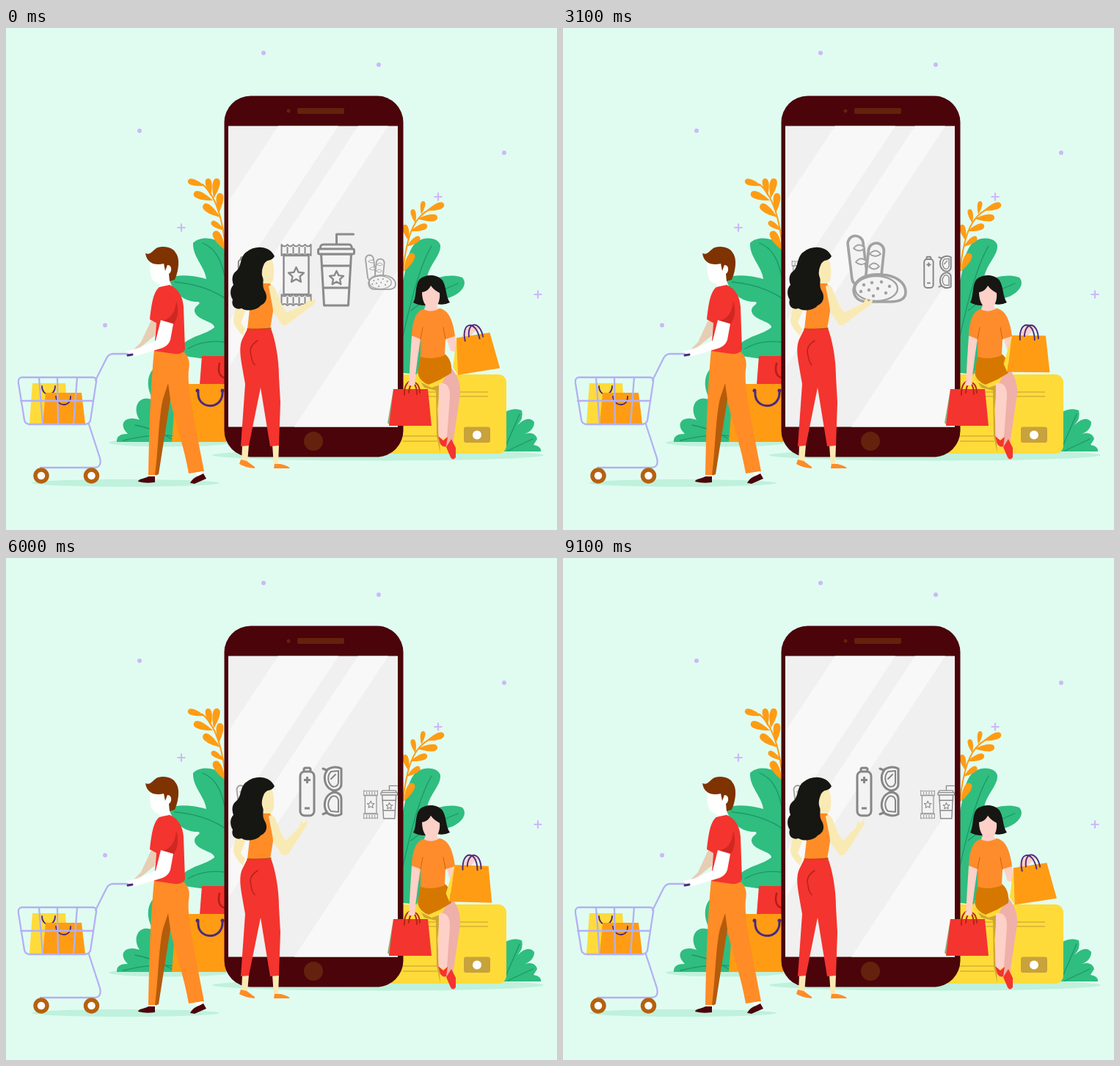
Recreate the animation shown at these times as an HTML page. Size 751 by 684 pixels, loop 9200 ms.

```html
<!DOCTYPE html>
<html lang="en">
<head>
<meta charset="utf-8">
<title>Mobile shopping</title>
<style>
html, body { margin: 0; width: 100%; height: 100%; overflow: hidden; background: #e0fcf1; }
svg { display: block; width: 100%; height: 100%; }
.line { fill: none; stroke-linecap: round; stroke-linejoin: round; }
.red { fill: #f4342e; } .orange { fill: #ff8c26; } .bag { fill: #ff9c14; } .yellow { fill: #ffdb3a; }
.skin { fill: #f9eab4; } .pink { fill: #fdd0c8; } .dark { fill: #4a040a; } .black { fill: #161612; }
.green { fill: #30bd80; } .vein { stroke: #1c9767; stroke-width: 1.3; }
.purple { stroke: #4b2a7c; }
.item { stroke-linejoin: round; stroke-linecap: round; fill: #f3f3f3; }
</style>
</head>
<body>
<svg viewBox="0 0 751 684">
  <g id="sparkles" fill="#cdb8f8" stroke="#cdb8f8"></g>
  <g fill="#bff1dc">
    <ellipse cx="222" cy="565" rx="82" ry="5.5"/>
    <ellipse cx="507" cy="582" rx="226" ry="7.5"/>
    <ellipse cx="163" cy="620" rx="128" ry="5"/>
  </g>

  <!-- plants -->
  <g class="green">
    <path d="M300 455L243 447Q236 440 240 432C250 420 272 418 284 408C285 400 259 398 257 386C256 378 268 376 262 373C240 374 226 356 222 341C236 334 258 338 273 342C271 325 254 312 255 293C264 283 288 284 300 300Z"/>
    <path d="M541 470V345C546 328 546 300 562 290C575 283 590 287 592 296C593 310 577 322 574 340C588 344 600 333 622 340C631 350 618 364 602 368C588 374 576 382 574 392L570 440L560 472Z"/>
    <path d="M151 564Q150 553 166 553C152 540 162 527 182 534C170 515 184 497 202 508C188 490 192 462 212 459L232 480V564Z"/>
    <path d="M676 577V526Q690 516 703 521Q706 532 697 541Q712 527 720 537Q720 548 707 553Q721 549 724 560L719 568Q730 570 729 577Z"/>
  </g>
  <path class="line vein" d="M298 338C292 310 282 299 268 293M298 368Q272 350 230 346M298 428Q270 424 248 437M541 420C552 370 566 320 580 297M552 385Q580 362 616 348M160 562Q200 552 228 556M176 541Q200 545 226 560M200 480Q206 500 212 520M680 572Q692 545 700 526M684 576Q705 566 718 560"/>
  <g id="twigs" fill="#ff9c14">
    <path class="line" stroke="#ff9c14" stroke-width="2" d="M299 300C296 265 287 230 268 213M541 330C546 290 553 260 576 248"/>
  </g>

  <!-- bags behind the phone -->
  <path class="red" d="M267 447H300V486H264Z"/>
  <path class="line" stroke="#b01f1a" stroke-width="2.5" d="M291 457C288 470 292 476 300 477"/>
  <path class="bag" d="M232 485H300V564H226Z"/>
  <path class="line purple" stroke-width="3" d="M262 496C260 521 296 521 295 496"/>
  <circle cx="261" cy="494" r="2.5" fill="#4b2a7c"/><circle cx="295" cy="494" r="2.5" fill="#4b2a7c"/>

  <!-- card -->
  <rect class="yellow" x="515" y="472" width="167" height="108" rx="11"/>
  <path stroke="#d6b235" stroke-width="1.6" d="M560 496H657M560 502H657M541 556H588M541 563H588"/>
  <rect x="624" y="543.5" width="36" height="21.5" rx="3" fill="#c8a23a"/>
  <circle cx="642" cy="554.5" r="6" fill="#fff"/>

  <!-- phone -->
  <rect class="dark" x="297.5" y="92.5" width="244" height="492" rx="36"/>
  <rect x="303" y="133.5" width="231" height="410" fill="#f0f0f0"/>
  <path fill="#f8f8f8" d="M371 133.5H453L303 360V236ZM480 133.5H521L303 463V401ZM534 330V543.5H393Z"/>
  <g fill="#64210d"><rect x="397" y="109" width="64" height="8" rx="2"/><circle cx="385" cy="113" r="2.5"/><circle cx="419" cy="563" r="13"/></g>

  <!-- products -->
  <g id="snack" class="item" stroke="#8a8a8a" stroke-width="3">
    <path stroke-width="2.4" d="M379 310V363H413V310Z"/>
    <path id="crimp" stroke-width="2"/>
    <path d="M451 295V281H474" fill="none"/>
    <path d="M430 308L434 378H467L471 308ZM429 302Q428 295 433 295H468Q472 295 472 302Z"/>
    <rect x="426" y="301" width="49" height="7" rx="2"/>
    <path d="M431 324H470M433 354H468"/>
  </g>
  <g id="glasses" class="item" stroke="#868686" stroke-width="3">
    <rect x="406" y="286" width="9" height="7" rx="2"/>
    <rect x="401" y="291" width="19" height="60" rx="6"/>
    <path d="M410.5 298V307M406 302.5H415M407 341H414" stroke-linecap="butt"/>
    <path id="lens" d="M432 287L437 289C444 284 452 284 457 287V308C457 315 450 318 444 316C433 311 432 296 438 289"/>
    <path stroke-width="2" d="M453 290V306C452 312 446 313 443 310C438 304 438 296 443 291Z"/>
    <path d="M432 349L437 347C444 352 452 352 457 349V328C457 321 450 318 444 320C433 325 432 340 438 347"/>
    <path stroke-width="2" d="M453 346V330C452 324 446 323 443 326C438 332 438 340 443 345ZM443 301L449 295"/>
  </g>
  <g id="bread" class="item" stroke="#a2a2a2" stroke-width="3.6">
    <rect x="391" y="283" width="21" height="68" rx="10.5" transform="rotate(-7 402 317)"/>
    <rect x="414.5" y="293" width="21" height="58" rx="10.5" transform="rotate(6 425 322)"/>
    <path stroke-width="1.8" d="M396 300Q404 291 411 300Q404 307 396 300ZM399 319Q406 310 414 318Q407 326 399 319ZM418 308Q426 299 433 308Q426 314 418 308ZM417 325Q424 316 431 325Q424 332 417 325Z"/>
    <path d="M396 357C398 340 416 335 434 336C454 337 467 347 467 360C467 370 458 373 446 373H414Q397 372 396 357Z"/>
    <ellipse cx="427" cy="355" rx="29" ry="17" stroke-width="2.4"/>
    <g id="seeds" fill="#a2a2a2" stroke="none"></g>
  </g>
  <g id="hearts"></g>

  <!-- man and cart -->
  <path class="yellow" d="M36 484H81L85 539H32Z"/>
  <path class="line purple" stroke-width="1.8" d="M49 488C49 503 67 503 67 488"/>
  <path class="bag" d="M54 497H103L108 539H50Z"/>
  <path class="line purple" stroke-width="1.8" d="M68 502C69 517 89 517 88 502"/>
  <path fill="#e8cdb5" d="M198 398L205 402L203 419L182 436L172 440L184 428Z"/>
  <path class="orange" d="M202 438L243 442Q252 450 249 466C246 490 260 550 270 604L249 607C243 570 228 530 221 495C216 540 208 580 204 611L194 609C195 560 196 500 202 438Z"/>
  <path fill="#b35c0c" d="M221 484L224 506L208 608L203 610C208 570 208 530 214 505Z"/>
  <path fill="#fff" d="M194 609H204V613H193ZM257 606L268 604L269 609L262 611ZM197 318L222 322C227 324 226 332 222 335L224 352L208 356L210 349C198 347 195 336 197 318Z"/>
  <path class="dark" d="M203 611V619Q190 621 180 618C180 614 190 614 194 611ZM269 607L273 614L257 621L251 620C254 614 258 612 263 610Z"/>
  <path fill="#7f3300" d="M190 307C198 310 200 302 207 299C219 296 229 301 231 306C238 314 235 332 230 343L223 345L222 335C227 332 226 322 220 323L217 331L215 321C204 324 192 321 190 307Z"/>
  <path class="red" d="M209 353L223 350C235 355 241 366 242 380L244 438Q240 445 230 444L202 440L205 402L196 397C198 380 200 360 209 353Z"/>
  <path fill="#cf2823" d="M232 372Q238 390 228 404L212 399Q230 396 232 372Z"/>
  <path fill="#fff" d="M211 398L228 403L224 425Q221 433 213 436L180 446Q169 449 164 444V440L178 437L204 426Z"/>
  <path class="line" stroke="#b3b0f3" stroke-width="2.3" d="M166 444H146Q140 444 137 450L122 480M22 476H118Q124 476 123 482L115 535Q113 540 107 540H33Q26 540 25 534L17 484Q16 476 22 476ZM20 508H119M45 476L50 540M70 476L71 540M97 476L92 540M113 540L128 586Q131 599 120 599H47"/>
  <path class="line purple" stroke-width="3" d="M166 446L172 445"/>
  <g fill="#fff" stroke="#b5610f" stroke-width="5.5"><circle cx="48" cy="610" r="8"/><circle cx="116.5" cy="610" r="8"/></g>

  <!-- standing woman -->
  <path class="skin" d="M313 380L327 384L320 402L326 410L323 419C315 412 309 403 310 396ZM350 316L362 315C366 322 366 336 364 344L360 349L348 352ZM322 568H331L329 592H321ZM363 568H372L371 596H365Z"/>
  <path class="orange" d="M348 348L360 348C367 360 363 374 364 386L360 410H329L333 375ZM320 588L328 590L339 598V600Q326 599 318 594ZM366 594L374 594Q386 597 387 600H365Z"/>
  <path class="red" d="M329 410L361 409C367 425 372 450 372 475L374 510L372 569L360 570L347 490L331 569L320 570L326 485C321 455 316 438 322 424Z"/>
  <path class="line" stroke="#b94d16" stroke-width="1.5" d="M329 410Q346 412 361 409"/>
  <path class="line" stroke="#b9221d" stroke-width="1.5" d="M343 426Q330 434 334 446Q335 455 339 459"/>
  <path class="skin" d="M358 352Q364 346 369 360L375 375L384 390L382 405H377L365 388Z"/>
  <path id="forearm" class="skin" d="M378 391Q384 386 389 385L409 375L414 367L416 373L421 369Q424 374 416 379L383 404Q375 407 374 398Z"/>
  <path class="black" d="M366 311C360 297 340 295 328 305C318 312 322 324 314 331C307 336 308 344 310 350C304 356 306 366 309 370C306 379 314 385 321 382C329 387 343 384 347 378C357 374 356 364 353 359C348 351 352 345 350 340C347 333 350 326 352 321C357 314 361 319 366 311Z"/>

  <!-- seated woman -->
  <path fill="#cfa632" d="M560 474L566 483L580 490L592 486L588 520L592 580L587 555L586 494L570 490Z"/>
  <path class="black" d="M555 374C560 366 557 350 564 342C573 335 588 335 595 344C601 354 599 366 605 374Q597 378 588 376L570 378Q562 378 555 374Z"/>
  <path class="pink" d="M567 360C574 359 577 355 579 351C583 357 588 359 591 361C592 370 589 376 587 379L591 384L580 391L569 385L572 378Q567 371 567 360ZM553 419L565 423L561 450L557 482L549 487L551 450ZM600 422L612 419L614 432L630 406Q638 400 645 410L638 414L616 442L606 440Z"/>
  <path fill="#eeb0a8" d="M592 488L606 462C618 475 621 490 618 506L609 568L600 570Z"/>
  <path class="pink" d="M590 484Q606 482 605 503L601 558L590 561C588 540 590 510 590 484Z"/>
  <path class="red" d="M589 556L596 562L602 557L600 570Q596 572 592 567ZM600 571L607 560L613 572V585Q609 590 606 585Z"/>
  <path fill="#d67800" d="M565 446Q580 452 598 444C606 450 608 460 607 470L592 479L576 486Q564 482 561 470Z"/>
  <path fill="#fe8c2b" d="M569 383Q579 389 591 382C602 384 609 396 612 420L599 424L598 446Q580 453 565 448L565 424L553 419C554 400 558 386 569 383Z"/>
  <path class="line" stroke="#c96614" stroke-width="1" d="M565 424L568 408M599 424L596 408"/>
  <path fill="#8fae7a" d="M528 492L520 538L524 542Z"/>
  <path class="red" d="M528 492H575L580 542H522Z"/>
  <path class="line" stroke="#b52418" stroke-width="2" d="M543 500C542 476 560 476 560 499M549 497C550 478 564 480 564 497"/>
  <ellipse class="pink" cx="553" cy="484" rx="5" ry="3.5"/>
  <g id="swing">
    <path class="yellow" d="M612 419L601 458L606 469Z"/>
    <path class="bag" d="M612 419H658L664 469H606Z"/>
    <path class="line purple" stroke-width="1.9" d="M623 425C621 398 642 398 643 425M629 420C630 399 647 400 648 423"/>
  </g>
</svg>
<script>
const $ = id => document.getElementById(id);
const add = (id, markup) => $(id).insertAdjacentHTML('beforeend', markup);
const clamp = v => Math.max(0, Math.min(1, v));
const ease = (t, a, b) => { const x = clamp((t - a) / (b - a)); return x * x * (3 - 2 * x); };
const mix = (a, b, p) => a + (b - a) * p;
const LOOP = 9200;

for (const [x, y] of [[351, 34], [508, 50], [182, 140], [679, 170], [135, 405]])
  add('sparkles', `<circle cx="${x}" cy="${y}" r="3" stroke="none"/>`);
for (const [x, y] of [[239, 272], [589, 230], [725, 363]])
  add('sparkles', `<path stroke-width="2.2" d="M${x - 5.5} ${y}h11M${x} ${y - 5.5}v11"/>`);

// Slender drop, round at the tip and pointed at the base
function leaf(x1, y1, x2, y2) {
  const nx = (y2 - y1) * .24, ny = (x1 - x2) * .24;
  const mx = mix(x1, x2, .4), my = mix(y1, y2, .4);
  add('twigs', `<path d="M${x1} ${y1}C${x1 + nx} ${y1 + ny} ${mx + nx} ${my + ny} ${x2} ${y2}C${mx - nx} ${my - ny} ${x1 - nx} ${y1 - ny} ${x1} ${y1}"/>`);
}
[[248, 208, 271, 215], [275, 205, 279, 229], [288, 205, 283, 232], [256, 225, 282, 235],
 [292, 225, 290, 252], [269, 241, 292, 258], [280, 264, 298, 276], [284, 277, 299, 303],
 [597, 240, 573, 249], [569, 236, 566, 254], [554, 247, 558, 266], [588, 258, 561, 260],
 [574, 269, 551, 277], [543, 268, 549, 290], [564, 285, 546, 298], [555, 307, 542, 332]
].forEach(l => leaf(...l));

function star(x, y, r) {
  const pts = Array.from({ length: 10 }, (_, i) => {
    const a = i * Math.PI / 5 - Math.PI / 2, d = i % 2 ? r * .48 : r;
    return `${x + d * Math.cos(a)},${y + d * Math.sin(a)}`;
  });
  add('snack', `<polygon stroke-width="2.4" points="${pts.join(' ')}"/>`);
}
star(396, 337, 11);
star(451, 341, 10);

// Crimped wrapper ends
let crimp = '';
for (const y of [295, 363]) {
  crimp += `M376 ${y}` + 'q4 5 8 0'.repeat(5) + 'v15' + 'q-4 -4 -8 0'.repeat(5) + 'z';
  for (let x = 384; x < 415; x += 8) crimp += `M${x} ${y + 4}v8`;
}
$('crimp').setAttribute('d', crimp);

for (const [x, y] of [[410, 350], [421, 347], [434, 346], [445, 352], [406, 359], [417, 357], [429, 355], [440, 361], [423, 365]])
  add('seeds', `<circle cx="${x}" cy="${y}" r="2.2"/>`);

const likes = [[322, 273, 15, 0], [277, 244, 10, 18], [305, 231, 6, 0], [329, 231, 6.5, 0]].map(([x, y, r, turn]) => {
  add('hearts', `<g><path fill="#f4513f" d="M-15 0A15 15 0 1 1 11 10L14 15L6 13.7A15 15 0 0 1 -15 0Z"/><path fill="#fff" d="M0 8C-16 -3 -5 -11 0 -4C5 -11 16 -3 0 8Z"/></g>`);
  return { node: $('hearts').lastElementChild, x, y, r, turn };
});

// Carousel: slot 0 is the centre, 1 the right side, 2 the left side
const products = [
  { node: $('snack'), x: 425, y: 329, small: .46, bend: .4 },
  { node: $('bread'), x: 427.5, y: 327.5, small: .52, bend: 1 },
  { node: $('glasses'), x: 429, y: 318, small: .65, bend: 1 }
];
const slotPose = (g, slot) => [[g.x, g.y, 1], [510.5, 332.5, g.small], [335, 333, g.small]][slot];

function place(g, index, stage, p) {
  const slot = (index - stage + 3) % 3;
  let from = slotPose(g, slot), to = slotPose(g, (slot + 2) % 3), alpha = 1;
  if (slot === 2) {
    if (p < .2) { to = from; alpha = 1 - p / .2; }
    else { from = [488, 329, g.small * .75]; alpha = clamp((p - .2) * 1.6); }
  }
  const x = mix(from[0], to[0], slot === 0 ? p ** g.bend : p);
  const y = mix(from[1], to[1], p), s = mix(from[2], to[2], p);
  g.node.setAttribute('transform', `translate(${x} ${y}) scale(${s}) translate(${-g.x} ${-g.y})`);
  g.node.setAttribute('opacity', alpha);
}

const armKeys = [[0, 0], [800, -35], [1100, -35], [2000, -20], [3000, 0], [3150, 0], [4200, -35], [5000, -35], [6000, -20]];
function armAngle(t) {
  const i = armKeys.findIndex(k => k[0] > t);
  if (i < 0) return armKeys.at(-1)[1];
  const [a, from] = armKeys[i - 1], [b, to] = armKeys[i];
  return mix(from, to, ease(t, a, b));
}

function drawLike({ node, x, y, r, turn }, i, t) {
  const start = 6050 + i * 150;
  const grow = ease(t, start, start + 450);
  node.style.display = t > start && t < 7950 ? 'inline' : 'none';
  node.setAttribute('transform', `translate(${x} ${y}) rotate(${turn}) scale(${r / 15 * mix(.2, 1, grow)})`);
  node.setAttribute('opacity', 1 - ease(t, 7500, 7950));
}

function draw(t) {
  const stage = t < 3000 ? 0 : 1;
  const p = stage ? ease(t, 3150, 4400) : ease(t, 0, 1250);
  products.forEach((g, i) => place(g, i, stage, p));
  $('forearm').setAttribute('transform', `rotate(${armAngle(t)} 380 397)`);
  $('swing').setAttribute('transform', `rotate(${-3 - 6 * Math.cos(t / 2300 * 2 * Math.PI)} 634 408)`);
  likes.forEach((like, i) => drawLike(like, i, t));
}

const began = performance.now();
function tick() {
  draw((performance.now() - began) % LOOP);
  requestAnimationFrame(tick);
}
tick();
</script>
</body>
</html>
```
